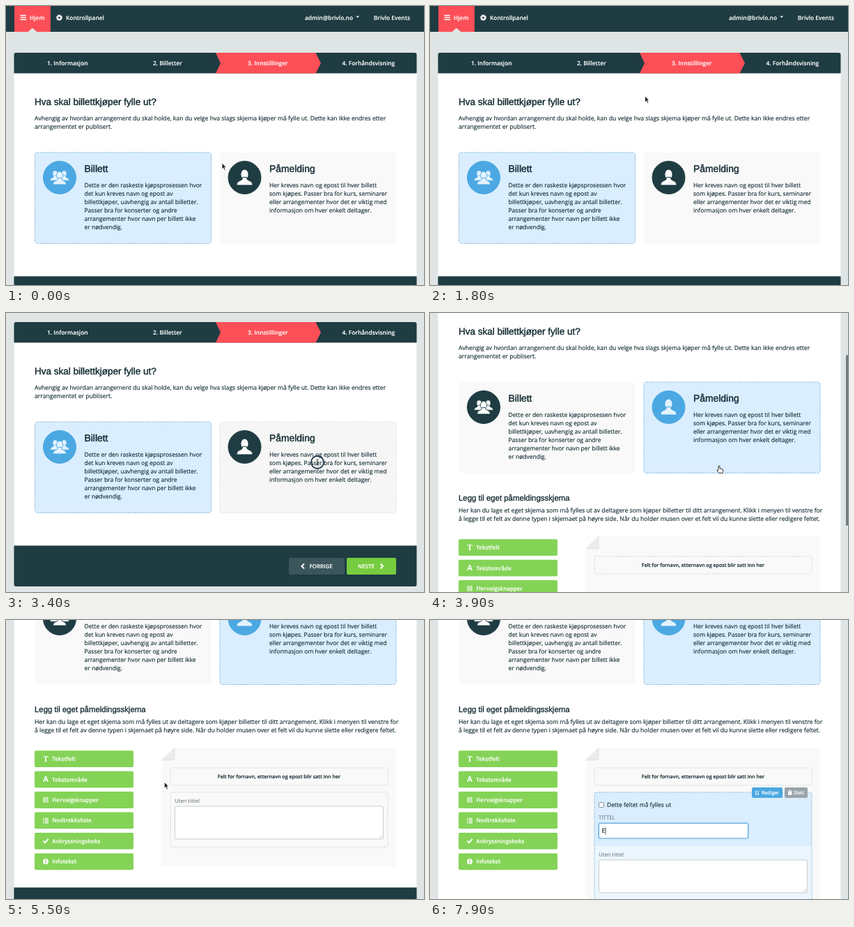
An HTML page for the animation above (8000 ms loop, 600 px wide and 400 px high).

```html
<!DOCTYPE html>
<html lang="no">
<head>
<meta charset="utf-8">
<title>Påmeldingsskjema</title>
<style>
  html, body { margin: 0; width: 100%; height: 100%; overflow: hidden; background: #dfe5e4; }
  #stage { display: block; width: 600px; height: 400px; }
  text {
    font: 8.5px "Open Sans", sans-serif; fill: #0f282e; stroke: #0f282e; stroke-width: .14px;
    text-rendering: geometricPrecision; white-space: pre;
  }
  .intro { font-size: 8.64px; }
  .white { font-size: 8.4px; font-weight: 600; fill: #fff; stroke: #fff; }
  .menu { font-size: 8.05px; }
  .caps { font-size: 7.9px; }
  .tiny { font-size: 6.8px; }
  .note { font-size: 7.1px; font-weight: 600; text-anchor: middle; }
  .label { font-size: 7.75px; fill: #5d6b70; stroke: none; }
  .end { text-anchor: end; }
  .title { font: 13.9px "Liberation Sans", Arial, sans-serif; stroke-width: .4px; }
  .heading { font-size: 13.5px; }
  .subtitle { font-size: 11.4px; stroke-width: .3px; }
  .dark { fill: #1e3c42; }
  .line { fill: none; stroke: #fff; stroke-width: 1.5; }
  .dash { fill: none; stroke: #d0d5d7; stroke-dasharray: 2 1.5; }
  .box { fill: #fff; stroke: #c8cdd0; }
  .card > rect { fill: #f9f9f9; stroke: none; stroke-dasharray: 2 1.5; }
  .card.hover > rect { fill: #f6f6f6; stroke: #e3e0da; }
  .card.on > rect { fill: #daeeff; stroke: #74b1da; }
  .card .badge { fill: #1e3c42; stroke: #1e3c42; }
  .card.on .badge { fill: #4ba8e2; stroke: #4ba8e2; }
  .badge use { fill: #fff; }
  .card.on .badge use { fill: #e4f3ff; }
  .item rect { fill: #84d357; }
  .item.hover rect { fill: #6fc142; }
  .pointer { fill: #222; stroke: #fff; stroke-width: .8; }
</style>
</head>
<body>
<svg id="stage" viewBox="0 0 600 400"></svg>
<script>
const LOOP = 8000;
const stage = document.getElementById('stage');

const text = (x, y, str, cls = '') => `<text x="${x}" y="${y}" class="${cls}">${str}</text>`;
const lines = (x, y, rows, cls) => rows.map((row, i) => text(x, y + i * 12, row, cls)).join('');
const rect = (x, y, w, h, attrs = '') => `<rect x="${x}" y="${y}" width="${w}" height="${h}" ${attrs}/>`;
const path = (d, attrs = 'class="line"') => `<path d="${d}" ${attrs}/>`;
const person = (x, y, scale) =>
  `<use href="#person" transform="translate(${x} ${y}) scale(${scale})"/>`;

const card = (id, x, title, rows, icon) => `
  <g class="card" id="${id}" transform="translate(${x} 210)">
    ${rect(.5, 0, 253, 130.5, 'rx="4"')}
    <g class="badge"><circle cx="36" cy="36" r="23.5"/>${icon}</g>
    ${text(71.5, 27.9, title, 'title')}${lines(71.5, 50.3, rows)}
  </g>`;

const glyph = (char, family) =>
  `<text x="0" y="3.8" text-anchor="middle" style="font:bold 11px ${family};fill:#fff;stroke:none">${char}</text>`;
const menuIcons = [
  glyph('T', "'Noto Serif',serif"),
  glyph('A', "'Open Sans',sans-serif"),
  [[-2, -2], [2, -2], [-2, 2], [2, 2]].map(([x, y]) =>
    `<circle cx="${x}" cy="${y}" r="1.5" fill="none" stroke="#fff"/>`).join(''),
  path('M-4 -3h1.5M-4 -.8h1.5M-4 1.4h1.5M-4 3.6h1.5M-1.5 -3h5.5M-1.5 -.8h5.5M-1.5 1.4h5.5M-1.5 3.6h5.5',
    'stroke="#fff" stroke-width="1.2"'),
  path('M-3.5 0L-1 2.5L3.5 -2.5', 'class="line" style="stroke-width:2"'),
  '<circle r="4" fill="#fff"/><path d="M0 -2.6v1.4M0 -.5v3" stroke="#84d357" stroke-width="1.5"/>'
];
const menu = ['Tekstfelt', 'Tekstområde', 'Flervalgsknapper', 'Nedtrekksliste', 'Avkryssningsboks', 'Infotekst']
  .map((name, i) => `
    <g class="item" id="item${i}" transform="translate(41 ${435.2 + i * 29.45})">
      ${rect(0, 0, 142, 23.8, 'rx="2"')}
      <g transform="translate(16 11.7)">${menuIcons[i]}</g>
      ${text(25.3, 14.9, name, 'white menu')}
    </g>`).join('');

const nav = `
  ${rect(0, 0, 600, 37, 'class="dark"')}
  ${rect(12, 0, 52, 37, 'fill="#fd4f57"')}
  ${path('M31.5 37L38 31.5L44.5 37Z', 'fill="#dfe5e4"')}
  ${path('M20.5 13.5h8.5M20.5 16.5h8.5M20.5 19.5h8.5')}
  ${text(34, 20, 'Hjem', 'white')}
  <circle cx="76.5" cy="16.7" r="2.5" class="line" style="stroke-width:2"/>
  <circle cx="76.5" cy="16.7" r="3.8" class="line" stroke-dasharray="1.6 1.38"/>
  ${text(86, 20, 'Kontrollpanel', 'white')}
  ${text(498, 20, 'admin@brivlo.no', 'white end')}
  ${path('M502.5 14.5h4.6l-2.3 2.6Z', 'fill="#fff"')}
  ${text(580, 20, 'Brivlo Events', 'white end')}`;

const tabs = `
  ${path('M11.5 96.5V70q0-3 3-3H586.5q3 0 3 3V96.5Z', 'class="dark"')}
  ${path('M301 67H444.5L452 82L444.5 96.5H301L308 82Z', 'fill="#fd4f57"')}
  ${text(59, 85, '1. Informasjon', 'white')}${text(211, 85, '2. Billetter', 'white')}
  ${text(347, 85, '3. Innstillinger', 'white')}${text(482.5, 85, '4. Forhåndsvisning', 'white')}`;

const field = `
  <g id="field">
    ${rect(236, 495, 312, 79, 'id="fieldFill" rx="3"')}
    <svg id="editor" x="236" y="495" width="312" height="0">
      ${rect(0, 0, 312, 78, 'fill="#daeeff"')}
      ${rect(6.5, 14.5, 7, 7, 'class="box" rx="1.5" style="stroke:#8d979c"')}
      ${text(18, 21, 'Dette feltet må fylles ut')}
      ${text(6, 38.5, 'TITTEL', 'label')}
      ${rect(5, 43, 217, 24, 'id="glow" rx="3" fill="#a9d5f5"')}
      ${rect(6.5, 44.5, 214, 21.5, 'id="input" class="box" rx="2"')}
      <text id="typed" x="10.5" y="58.2">E</text>
      ${path('M0 50.5v10', 'id="caret" stroke="#222" stroke-width=".8"')}
    </svg>
    <g id="preview">
      ${text(242, 510, 'Uten tittel', 'label')}
      ${rect(242.5, 515, 299, 47, 'class="box" rx="2"')}
      ${path('M536 560.5l4-4M538.5 560.5l1.5-1.5', 'stroke="#999" stroke-width=".6"')}
    </g>
    ${rect(236, 495, 312, 79, 'id="fieldEdge" class="dash" rx="3"')}
    <g id="tools">
      ${rect(462, 488, 44, 15, 'rx="2" fill="#4ba8e2"')}
      ${path('M471.5 496v2.3h-4v-4.5h2.5M469.5 496.3l3.3-3.6', 'class="line" style="stroke-width:.9"')}
      ${text(476, 498.3, 'Rediger', 'white tiny')}
      ${rect(509, 488, 33, 15, 'rx="2" fill="#9aa4a8"')}
      ${path('M514 493h5.5M515.5 492h2.5M514.5 494h4.5v4.5h-4.5Z', 'fill="#fff" stroke="#fff" stroke-width=".7"')}
      ${text(522, 498.3, 'Slett', 'white tiny')}
    </g>
  </g>`;

const form = `
  <g id="form">
    ${text(41, 380.3, 'Legg til eget påmeldingsskjema', 'title subtitle')}
    ${lines(41, 396.7, [
      'Her kan du lage et eget skjema som må fylles ut av deltagere som kjøper billetter til ditt arrangement. Klikk i menyen til venstre for',
      'å legge til et felt av denne typen i skjemaet på høyre side. Når du holder musen over et felt vil du kunne slette eller redigere feltet.'
    ], 'intro')}
    ${menu}
    ${rect(224, 431, 336, 170, 'id="panel" fill="#f9f9f9"')}
    ${path('M224 449V431H242Z', 'fill="#fff"')}
    ${path('M242 431V449H224Z', 'fill="#ebebeb" stroke="#d5d8d9" stroke-width=".6"')}
    ${rect(236, 460, 312, 25, 'class="dash" rx="3"')}
    ${text(392, 474.8, 'Felt for fornavn, etternavn og epost blir satt inn her', 'note')}
    ${field}
  </g>`;

const footer = `
  <g id="footer">
    ${path('M11.5 387.5H589.5V443q0 3-3 3H14.5q-3 0-3-3Z', 'class="dark"')}
    ${rect(406, 405, 80, 24, 'rx="2" fill="#3c565c"')}
    ${path('M428 413.5l-3.5 3.5l3.5 3.5', 'class="line" style="stroke-width:2"')}
    ${text(435.5, 419.9, 'FORRIGE', 'white caps')}
    ${rect(489, 405, 71, 24, 'rx="2" fill="#76cc3e"')}
    ${path('M537.5 413.5l3.5 3.5l-3.5 3.5', 'class="line" style="stroke-width:2"')}
    ${text(505, 419.9, 'NESTE', 'white caps')}
  </g>`;

stage.innerHTML = `
  <defs><g id="person">
    <ellipse cy="-4" rx="5.6" ry="7.2"/>
    <path d="M-11.5 11.5Q-11.5 6.5-6 4.7Q-2.7 3.5-2.7 0H2.7Q2.7 3.5 6 4.7Q11.5 6.5 11.5 11.5Z"/>
  </g></defs>
  <rect width="600" height="400" fill="#dfe5e4"/>
  <g id="page">
    ${nav}
    ${rect(11.5, 90, 578, 300, 'id="paper" fill="#fff"')}
    ${tabs}
    ${text(41, 142.3, 'Hva skal billettkjøper fylle ut?', 'title heading')}
    ${lines(41, 164.2, [
      'Avhengig av hvordan arrangement du skal holde, kan du velge hva slags skjema kjøper må fylle ut. Dette kan ikke endres etter',
      'arrangementet er publisert.'
    ], 'intro')}
    ${card('ticket', 41, 'Billett', [
      'Dette er den raskeste kjøpsprosessen hvor', 'det kun kreves navn og epost av',
      'billettkjøper, uavhengig av antall billetter.', 'Passer bra for konserter og andre',
      'arrangementer hvor navn per billett ikke', 'er nødvendig.'
    ], person(29.5, 33, .62) + person(42.5, 33, .62) + person(36, 36.5, .82))}
    ${card('signup', 306.5, 'Påmelding', [
      'Her kreves navn og epost til hver billett', 'som kjøpes. Passer bra for kurs, seminarer',
      'eller arrangementer hvor det er viktig med', 'informasjon om hver enkelt deltager.'
    ], person(36, 35.5, 1))}
    ${form}${footer}
  </g>
  ${rect(597, 0, 3, 245, 'id="scrollbar" rx="1.5" fill="#70797c"')}
  <circle id="ring" fill="none" stroke="#20374a" stroke-width="1.8"/>
  <g id="mouse">
    ${path('M0 0V9L2.1 7.2L3.6 10.5L5.2 9.8L3.7 6.6H6.3Z', 'id="arrow" class="pointer"')}
    ${path('M-1.5 -4Q0 -4 0 -3V3Q0 4-1.5 4M1.5 -4Q0 -4 0 -3M1.5 4Q0 4 0 3', 'id="beam" fill="none" stroke="#222"')}
    ${path('M-1 0Q0-1 1 0V3.5L5 4.5Q6 5 5.7 7L4.8 10H0L-3 6.5Q-3.2 5-1 6Z', 'id="hand" fill="#fff" stroke="#222" stroke-width=".9"')}
  </g>`;

const el = id => document.getElementById(id);
const show = (id, on) => el(id).style.display = on ? '' : 'none';
const set = (id, name, value) => el(id).setAttribute(name, value);
const move = (id, x, y) => set(id, 'transform', `translate(${x} ${y})`);
const within = (t, from, to) => t >= from && t < to;

// Linear interpolation over [time, value, ...] keys; holds outside the range.
function track(keys, t) {
  const next = keys.findIndex(key => key[0] > t);
  if (next < 0) return keys[keys.length - 1].slice(1);
  const a = keys[Math.max(0, next - 1)], b = keys[next];
  const k = Math.max(0, (t - a[0]) / (b[0] - a[0] || 1));
  return a.slice(1).map((v, i) => v + (b[i + 1] - v) * k);
}

const scrollKeys = [[1800, 0], [1900, 28], [2000, 54], [3600, 54], [3900, 111], [4500, 248]];
const editorKeys = [[6700, 0], [7000, 77]];
const mouseKeys = [
  [1000, 310, 225], [1800, 308.5, 129], [2100, 308.5, 129], [2600, 395, 180], [2700, 395, 180],
  [3200, 447, 214], [3600, 447, 214], [3900, 415, 219.5], [4200, 405, 220], [4900, 149.5, 227],
  [5200, 149.5, 227], [6500, 486.5, 249.5], [6700, 486.5, 249.5], [7400, 300, 302]
];
const cursorKeys = [
  [0, 'arrow'], [2800, 'beam'], [3700, 'hand'], [4300, 'arrow'], [4800, 'hand'],
  [5500, 'arrow'], [6400, 'hand'], [6900, 'arrow'], [7300, 'beam'], [7600, 'none']
];
const clicks = [[3400, 9], [3500, 17], [3700, 0], [5100, 17], [5200, 0], [6700, 12], [6800, 0]];
const latest = (keys, t) => (keys.filter(key => key[0] <= t).pop() || [0, 0])[1];

function draw(now) {
  const t = Math.floor(now % LOOP / 100) * 100;
  const [scroll] = track(scrollKeys, t);
  const [open] = track(editorKeys, t);
  const [x, y] = track(mouseKeys, t);
  const chosen = t >= 3500;

  move('page', 0, -scroll);
  el('ticket').classList.toggle('on', !chosen);
  el('signup').classList.toggle('on', chosen);
  el('signup').classList.toggle('hover', within(t, 2800, 3500));
  el('item1').classList.toggle('hover', within(t, 4800, 5400));
  show('form', chosen);
  const extra = chosen ? 244 + open : 0;
  move('footer', 0, extra);
  set('paper', 'height', 298 + extra);

  show('field', t >= 5200);
  show('tools', t >= 6200);
  set('panel', 'height', 170 + open);
  set('editor', 'height', open);
  move('preview', 0, open);
  set('fieldFill', 'height', 79 + open);
  set('fieldFill', 'fill', open ? '#ebf6ff' : '#f9f9f9');
  set('fieldEdge', 'height', 79 + open);
  el('fieldEdge').style.stroke = open ? '#84b7d8' : t >= 6200 ? '#a5afb4' : '';

  const focused = t >= 7400;
  show('glow', focused);
  el('input').style.stroke = focused ? '#62abdf' : '';
  show('typed', t >= 7900);
  show('caret', t >= 7600);
  move('caret', t >= 7900 ? 16 : 11, 0);

  show('scrollbar', within(t, 1900, 3000) || within(t, 3700, 5300));
  set('scrollbar', 'y', chosen ? 60 + (scroll - 111) * .547 : scroll * .88);
  set('scrollbar', 'height', chosen ? 245 : 350);

  const radius = latest(clicks, t);
  show('ring', radius > 0);
  set('ring', 'r', radius);
  set('ring', 'cx', x);
  set('ring', 'cy', y);
  move('mouse', x, y);
  for (const kind of ['arrow', 'beam', 'hand']) show(kind, latest(cursorKeys, t) === kind);

  requestAnimationFrame(draw);
}
requestAnimationFrame(draw);
</script>
</body>
</html>
```
